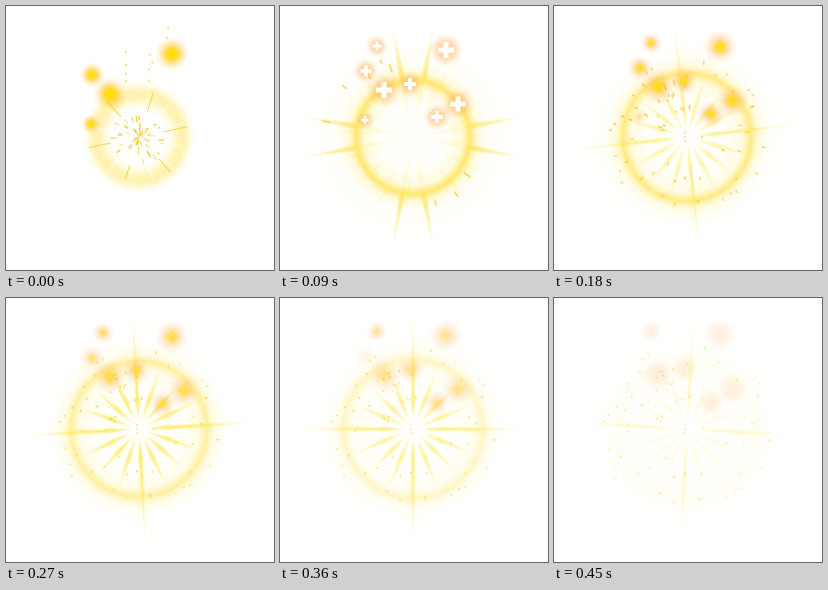
These frames come from a looping animation (268x264 px, 0.54 s). An HTML page with a canvas:

```html
<!DOCTYPE html>
<html lang="en">
<head>
<meta charset="utf-8">
<title>Golden burst</title>
<style>
html, body { margin: 0; width: 100%; height: 100%; overflow: hidden; background: #fff; }
canvas { display: block; width: 100vw; height: 100vh; }
</style>
</head>
<body>
<canvas id="stage" width="268" height="264"></canvas>
<script>
const ctx = document.getElementById('stage').getContext('2d');
const STEP = 90, COUNT = 6, TAU = Math.PI * 2, GOLDEN = 2.39996, CX = 133, CY = 131;
const WHITE = '255,255,255', GOLD = '255,224,66', PALE = '255,236,110', RAY = '255,230,50', SPARK = '246,196,20';

// x, resting y, arm length
const early = [[166, 37, 8], [86, 58, 5.5], [104, 77, 8], [85, 107, 3.8]];
const late = [[97, 33, 4.5], [130, 71, 6], [157, 104, 6], [178, 91, 7.5]];

const rgba = (c, a) => `rgba(${c},${a})`;
const rad = deg => deg * TAU / 360;
const clamp = v => Math.max(0, Math.min(1, v));

function seeded(s) {
  return () => (s = (s * 16807) % 2147483647) / 2147483647;
}

// stops are [radius, colour, alpha]
function halo(x, y, r, stops) {
  const g = ctx.createRadialGradient(x, y, 0, x, y, r);
  for (const [at, c, a] of stops) g.addColorStop(at / r, rgba(c, a));
  ctx.fillStyle = g;
  ctx.beginPath();
  ctx.arc(x, y, r, 0, TAU);
  ctx.fill();
}

function glow(x, y, r, c, a) {
  halo(x, y, r, [[0, c, a], [r * .45, c, a * .75], [r * .75, c, a * .25], [r, c, 0]]);
}

function dot(x, y, size) {
  ctx.fillRect(x - size / 2, y - size / 2, size, size);
}

// a radial dash at polar position (angle, d)
function dash(angle, d, len, width, alpha, twist = 0) {
  ctx.save();
  ctx.translate(CX + Math.cos(angle) * d, CY + Math.sin(angle) * d);
  ctx.rotate(angle + twist);
  ctx.fillStyle = rgba(SPARK, alpha);
  ctx.fillRect(-len / 2, -width / 2, len, width);
  ctx.restore();
}

// nested blades give the ray a soft edge
function ray(deg, from, to, width, color, alpha, mid) {
  const m = from + (to - from) * mid;
  ctx.save();
  ctx.translate(CX, CY);
  ctx.rotate(rad(deg));
  const g = ctx.createLinearGradient(from, 0, to, 0);
  g.addColorStop(0, rgba(color, alpha * .1));
  g.addColorStop(mid, rgba(color, alpha * .5));
  g.addColorStop(1, rgba(color, 0));
  ctx.fillStyle = g;
  for (const w of [width, width * .6, width * .25]) {
    ctx.beginPath();
    ctx.moveTo(from, 0);
    ctx.lineTo(m, -w / 2);
    ctx.lineTo(to, 0);
    ctx.lineTo(m, w / 2);
    ctx.fill();
  }
  ctx.restore();
}

function ring(n) {
  const r = 70 - 24 * (1 - n / 5) ** 2.8;
  const a = .9 * (1 - ((n - 1) / 4.2) ** 1.4);
  halo(CX, CY, r + 18, [
    [0, PALE, 0], [r * .6, PALE, 0], [r - 9, PALE, a * .2], [r - 3, GOLD, a * .6],
    [r, GOLD, a * .85], [r + 3, GOLD, a * .5], [r + 8, PALE, a * .2], [r + 18, PALE, 0]
  ]);
}

function plus(x, y, s, color, alpha) {
  const t = s * .32;
  ctx.fillStyle = rgba(color, alpha);
  ctx.beginPath();
  ctx.rect(x - s, y - t, s * 2, t * 2);
  ctx.rect(x - t, y - s, t * 2, s * 2);
  ctx.fill();
}

function drawPlus(x, y0, s, n, life) {
  const y = y0 + 11 * (1 - n / 5) ** 2;
  const a = life * (.75 - n * .11);
  glow(x, y, s * 1.8 + 3, n ? '255,176,90' : '255,196,40', a);
  if (n === 1) plus(x, y, s, WHITE, 1);
  else {
    const heat = life * clamp(1.2 - n * .25);
    glow(x, y, s * 1.2, '255,222,0', heat * .9);
    plus(x, y, s * .75, '255,222,10', heat * .7);
  }
}

function drawPluses(n) {
  for (const [x, y, s] of early) drawPlus(x, y, s, n, clamp((s - n - 1) / 2));
  if (n) for (const [x, y, s] of late) drawPlus(x, y, s, n, 1);
}

function ignite() {
  halo(CX, CY, 57, [
    [0, PALE, 0], [27, PALE, 0], [33, PALE, .2], [39, GOLD, .4], [45, GOLD, .42],
    [49, GOLD, .28], [53, PALE, .1], [57, PALE, 0]
  ]);
  for (let i = 0; i < 12; i++) ray(i * 30 + 12, 20, 52, 2.5, WHITE, .7, .5);
  const rnd = seeded(77);
  for (let i = 0; i < 44; i++)
    dash(i * GOLDEN, 3 + rnd() * 23, 2 + rnd() * 6, .8 + rnd() * .9, .5 + rnd() * .4);
  for (let i = 0; i < 6; i++) dash(rad(48 + i * 60), 36 + rnd() * 4, 14 + rnd() * 10, 1.1, .65);
  ctx.fillStyle = rgba(SPARK, .85);
  for (const x of [121, 145, 162])
    for (let i = 0; i < 4; i++) dot(x + rnd() * 4 - 2, 20 + (x % 3) * 25 + i * 9 + rnd() * 5, 1.5);
}

function flare() {
  for (let axis = 0; axis < 360; axis += 90)
    for (const side of [-10.5, 10.5]) {
      ray(axis + side, 50, 116, 7, GOLD, .6, .18);
      ray(axis + side, 12, 58, 6, PALE, .2, .7);
    }
  for (let i = 0; i < 16; i++) ray(i * 22.5 + 5, 24, 76 + i % 3 * 6, 5, PALE, .2, .6);
  const rnd = seeded(5);
  for (let i = 0; i < 8; i++) dash(rad(185 + i * 31 % 75 + (i % 3 ? 0 : 210)), 66 + rnd() * 24, 4 + rnd() * 7, 1.5, .7);
}

function sparks(n) {
  const alpha = 1.3 - n * .16, spread = .94 + n * .03, rnd = seeded(31);
  const speck = (angle, d) =>
    dash(angle, d * spread, n === 2 ? 2 + rnd() * 3 : 1.5 + rnd() * 1.5, 1.5, alpha * (.5 + rnd() * .4), (n - 2) * (rnd() - .5));
  for (let i = 0; i < 44; i++) speck(i * GOLDEN, 14 + 66 * Math.sqrt(rnd()));
  for (let i = 0; i < 18; i++) speck(rad(195 + rnd() * 75), 22 + rnd() * 38);
  ctx.fillStyle = rgba(SPARK, alpha * .7);
  for (const dy of [-4, 0, 4]) dot(CX - 2, CY + dy, 1.5);
}

function bloom(n) {
  const turn = (n - 4) * 3.2, swell = Math.sin(Math.PI * (n - .6) / 5);
  for (let i = 0; i < 16; i++)
    ray(i * 22.5 + turn, 6, 62 + i % 2 * 5, 6, RAY, .6 * swell ** 2, .4);
  for (let axis = 0; axis < 360; axis += 90) {
    ray(axis + turn, 8, 120, 5, RAY, .5 * swell, .4);
    ray(axis + turn + 3, 40, 104, 10, PALE, .12 * swell, .35);
  }
  halo(CX, CY, 16, [[0, WHITE, .9], [6, WHITE, .6], [16, WHITE, 0]]);
  sparks(n);
}

function draw(n) {
  ctx.fillStyle = '#fff';
  ctx.fillRect(0, 0, 268, 264);
  if (n === 0) ignite();
  else {
    halo(CX, CY, 112, [[0, PALE, .03], [70, PALE, .05 * (1 - n / 8)], [112, PALE, 0]]);
    ring(n);
    n === 1 ? flare() : bloom(n);
  }
  drawPluses(n);
}

let shown = -1;
function tick() {
  const n = Math.floor(performance.now() / STEP) % COUNT;
  if (n !== shown) draw(shown = n);
  requestAnimationFrame(tick);
}
tick();
</script>
</body>
</html>
```
